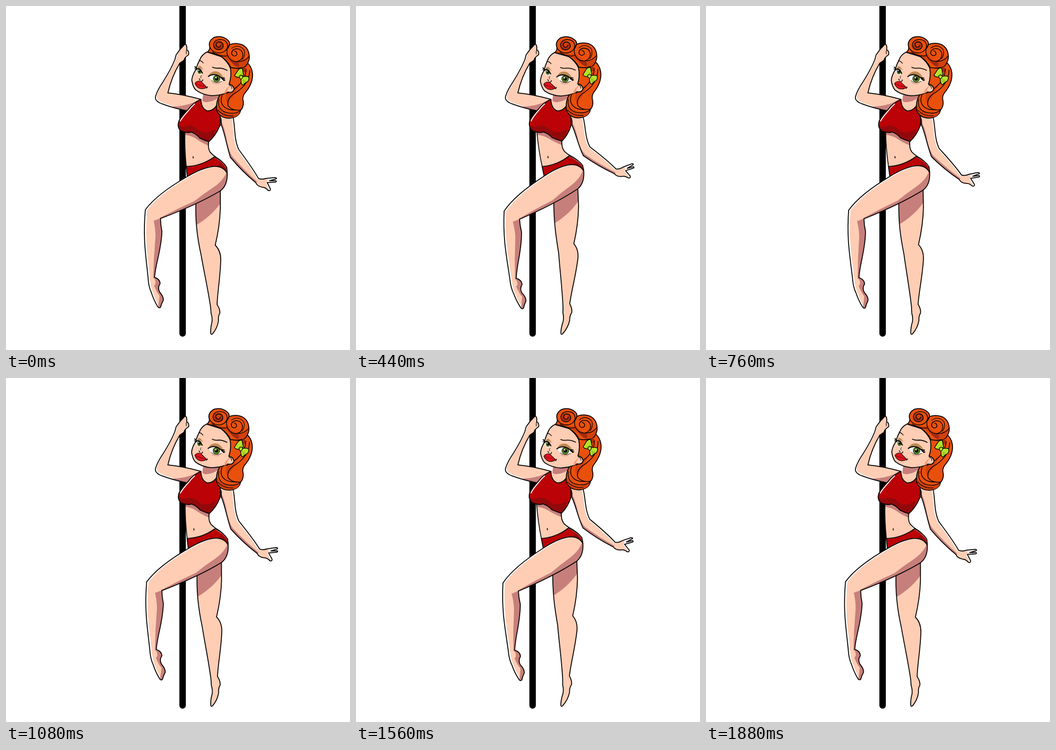
These frames come from a looping animation (748 px wide and 748 px high, 1.92 s). An HTML page with a canvas:

```html
<!DOCTYPE html>
<html lang="en">
<head>
<meta charset="utf-8">
<title>Pole dancer</title>
<style>
html, body { margin: 0; width: 100%; height: 100%; overflow: hidden; background: #fff; }
canvas { display: block; width: 748px; height: 748px; }
</style>
</head>
<body>
<canvas id="stage" width="748" height="748"></canvas>
<script>
const ctx = document.getElementById('stage').getContext('2d');
const SWAY = 960, STEP = 40;
const SKIN = '#ffcdb3', SHADE = '#c77f7b', RED = '#bb0307', DARK_RED = '#93090b';
const HAIR = '#e9500c', HAIR_MID = '#d3400b', HAIR_DARK = '#a52b10', LIME = '#b5e32c', INK = '#080505';

let k = 0;     // sway, 0 to 1
let warp;      // how the current part bends

const clamp = v => Math.max(0, Math.min(1, v));
const turn = (x, y, cx, cy, a) => {
  const c = Math.cos(a), s = Math.sin(a);
  return [cx + (x - cx) * c - (y - cy) * s, cy + (x - cx) * s + (y - cy) * c];
};

// Piecewise linear lookup over [position, value] stops
function ramp(v, stops) {
  for (let i = 1; i < stops.length; i++) {
    const [a, p] = stops[i - 1], [b, q] = stops[i];
    if (v <= b) return p + (q - p) * clamp((v - a) / (b - a));
  }
  return stops[stops.length - 1][1];
}

const still = (x, y) => [x, y];

const torso = (x, y) => {
  const u = Math.max(0, (y - 235) / 125) * k;
  return [x + 14 * u, y - 0.05 * (x - 390) * u];
};

const frontLeg = (x, y) => {
  const u = x - 481, v = y - 360;
  return [x + k * (14 - 0.008 * u + 0.0445 * v), y + k * (-5 - 0.0442 * u + 0.0015 * v)];
};

const backLeg = (x, y) => [
  x + k * ramp(y, [[400, 16], [440, 18], [517, 19], [655, 5.2], [714, 0]]),
  y + k * ramp(y, [[400, -6], [517, -3], [655, -1.5], [714, 0]])
];

const freeArm = (x, y) => {
  const bend = clamp((y - 295) / 40), lift = clamp((y - 245) / 75) * k;
  const [px, py] = turn(x, y, 495, 320, -0.26 * k * bend * bend * (3 - 2 * bend));
  return [px + 4 * lift, py - 5 * lift];
};

const head = (x, y) => turn(x, y, 465, 235, -0.043 * k);

const shape = d => new Path2D(d.replace(/([\d.]+),([\d.]+)/g,
  (m, x, y) => warp(+x, +y).map(v => v.toFixed(2)).join(',')));

function fill(d, color) {
  ctx.fillStyle = color;
  ctx.fill(shape(d));
}

function line(d, width = 2, color = INK) {
  ctx.strokeStyle = color;
  ctx.lineWidth = width;
  ctx.stroke(shape(d));
}

function inked(d, color, width = 2) {
  fill(d, color);
  line(d, width);
}

// Colour shifted inside its outline leaves a white rim of light
function lit(outline, color, dx, dy, shades, edge = outline) {
  const path = shape(outline);
  ctx.save();
  ctx.fillStyle = '#fff';
  ctx.fill(path);
  ctx.clip(path);
  ctx.translate(dx, dy);
  ctx.fillStyle = color;
  ctx.fill(path);
  ctx.translate(-dx, -dy);
  for (const [d, c] of shades) fill(d, c);
  ctx.restore();
  line(edge);
}

function drawPole() {
  warp = still;
  line('M384,0 L384,712', 14, '#000');
}

function drawBackLeg() {
  warp = backLeg;
  lit('M466,396 L466,440 Q465,478 455,520 Q467,532 467,552 C466,590 460,620 459,649 Q466,660 465,668 ' +
      'Q461,674 462,684 Q460,700 449,713 Q445,716 445,709 Q445,697 448,687 Q449,677 446,669 L445,656 ' +
      'C440,620 430,575 424,540 C416,505 411,470 413,424 Z', SKIN, 1, 0,
    [['M408,425 L470,392 L467,428 Q447,457 411,478 Z', SHADE]]);
}

function drawTorso() {
  warp = torso;
  const back = 'M441,292 Q438,309 444,318 Q449,324 457,329 Q476,340 481,360';
  const belly = 'M389,272 Q388,312 392,349 L395,373';
  lit('M389,268 Q388,312 392,349 L395,380 L470,380 L481,360 Q476,340 457,329 Q440,319 441,288 Z', SKIN, -3, 1,
    [['M385,270 L388,280 Q401,281 412,288 Q426,298 441,304 L446,285 Z', SHADE]], back);
  line(belly, 1.8);
  fill('M406.5,326 Q409,328 407.5,332 Q405,331 406.5,326 Z', INK);

  lit('M392,349 Q425,348 453,328 Q472,337 480,351 L481,364 Q470,348 450,349 Q426,352 394,371 Z', RED, -1, 1,
    [['M466,341 Q478,350 481,364 Q472,351 460,348 Z', DARK_RED]]);
}

function drawFreeArm() {
  warp = freeArm;
  const edge = 'M493,238 C499,262 495,288 506,312 C522,334 536,352 549,375 Q557,378 565,375 ' +
    'L585,373 Q590,374 587,376 L573,380 L587,380 Q589,382 586,383 L568,384 Q572,392 575,398 Q575,403 570,401 ' +
    'Q564,394 557,394 Q546,392 543,384 C526,370 507,352 488,329 C481,308 477,281 468,258 L467,244';
  lit(edge + ' L466,232 Z', SKIN, -3, 1, [
    ['M464,244 Q474,258 479,286 Q483,314 493,328 Q518,357 546,382 L541,389 L484,333 L466,268 Z', SHADE],
    ['M569,372 L592,370 L590,385 L568,383 Z', '#fff']
  ], edge);
}

function drawPoleArm() {
  warp = still;
  const edge = 'M394,228 Q364,222 340,213 Q323,207 325,197 Q329,183 342,164 Q359,137 367,117 L370,106 ' +
    'Q378,94 389,83 Q394,83 393,95 Q399,99 397,106 Q388,112 387,118 L378,124 Q360,154 352,189 ' +
    'Q384,192 424,203';
  lit(edge + ' L424,228 Z', SKIN, 3, -2, [
    ['M358,219 Q388,219 412,208 L424,230 L390,232 Z', SHADE]
  ], edge);
  line('M393,95 Q391,99 392,104', 1.3);
}

function drawNeck() {
  warp = still;
  fill('M430,186 L426,205 Q423,230 443,231 Q462,230 466,212 L466,186 Z', SKIN);
  fill('M429,190 L427,206 Q432,211 443,208 Q455,206 465,196 L466,186 Z', SHADE);
}

function drawTop() {
  warp = torso;
  lit('M424,203 Q407,210 396,225 Q381,240 376,250 Q371,264 381,272 Q393,277 403,274 Q414,278 421,287 ' +
      'Q431,292 441,295 Q456,282 465,260 Q468,244 463,226 L461,211 Q452,229 437,228 Q424,222 424,203 Z',
    RED, 0, 0,
    [['M370,256 Q384,267 396,260 Q410,259 420,271 Q434,280 455,268 L448,300 L420,298 L372,280 Z', DARK_RED]]);
  line('M410,213 Q403,219 398,226 Q384,241 379,250', 2, '#fff');
  line('M466,242 Q470,246 467,260', 1.4);
}

function drawFrontLeg() {
  warp = frontLeg;
  lit('M394,371 Q426,352 450,349 Q472,347 481,364 Q482,390 466,402 C434,421 384,444 336,462 ' +
      'Q336,476 339,490 C338,530 325,560 323,590 Q335,594 335,604 Q329,612 334,622 Q343,632 342,640 ' +
      'Q338,647 336,655 Q333,658 330,654 Q321,639 316,623 Q310,610 309,592 C305,548 297,508 303,443 ' +
      'Q328,409 394,371 Z', SKIN, 4, 1, [
    ['M482,354 Q476,378 450,395 Q430,408 410,424 Q372,441 334,461 L345,470 L475,410 L488,380 Z', SHADE],
    ['M340,460 L321,467 Q325,484 325,501 Q321,547 320,592 L330,592 L345,490 Z', SHADE],
    ['M321,590 Q329,602 322,608 Q329,625 334,630 Q333,643 330,657 L346,650 L340,595 Z', SHADE]
  ]);
}

function drawBackHair() {
  inked('M468,190 Q456,204 458,226 Q464,244 486,244 Q507,242 510,227 Q517,220 516,208 Q513,198 519,190 ' +
    'Q538,168 536,146 Q534,130 522,121 L484,112 L482,184 Z', HAIR);
  fill('M459,214 Q466,231 487,235 Q504,233 509,227 Q507,243 486,243 Q463,242 459,223 Z', HAIR_MID);
  fill('M484,180 Q497,179 509,168 Q498,187 493,198 Q483,207 484,216 Q476,207 479,194 Z', HAIR_MID);
  fill('M486,118 Q511,125 524,138 L519,145 Q501,133 488,135 Z', HAIR_DARK);
  line('M463,203 Q459,224 477,231 Q498,237 510,227', 1.6);
  line('M470,194 Q463,212 478,222 Q487,227 500,226', 1.6);
  line('M530,140 Q529,170 499,189 Q479,200 483,217 Q493,229 510,226', 1.6);
  line('M522,139 Q521,160 501,177 Q489,186 480,190', 1.6);
  line('M460,226 Q474,241 494,239', 1.3);
}

function drawFace() {
  inked('M437,100 Q425,106 421,118 Q415,129 413,138 Q405,150 404,161 Q406,175 412,182 Q426,193 447,195 ' +
    'Q472,194 482,187 Q493,190 496,181 Q495,172 485,170 Q491,153 488,135 Q482,121 468,110 Z', SKIN);
  fill('M489,173 Q477,178 474,191 L482,187 Q478,184 489,173 Z', '#ef9b77');
  line('M485,172 Q492,174 491,180', 1.2);

  fill('M416,137 Q420,122 430,140 Q423,133 416,137 Z', '#bd8952');
  fill('M440,152 Q447,139 461,143 Q471,148 474,160 Q458,144 440,152 Z', '#bd8952');

  fill('M414,137 Q422,131 427,146 Q421,153 415,145 Z', '#fff');
  fill('M441,153 Q457,143 472,162 Q456,172 446,161 Z', '#fff');
  const eyes = [[421, 142, 4.6, 5.8], [458, 158, 8, 7.6]];
  for (const [x, y, rx, ry] of eyes) {
    const [ex, ey] = warp(x, y);
    const disc = (sx, sy, s, color) => {
      ctx.beginPath();
      ctx.ellipse(ex + sx, ey + sy, rx * s, ry * s, 0, 0, 7);
      ctx.fillStyle = color;
      ctx.fill();
    };
    disc(0, 0, 1, '#24330c');
    disc(0, 0.4, 0.83, '#5f8420');
    disc(0, 0, 0.5, '#090b04');
    disc(-1.4, -2.2, 0.2, '#fff');
  }
  line('M411,132 L415,137 Q421,133 427,146', 2.3);
  line('M410,136 L415,139', 1.4);
  line('M440,153 Q457,142 474,162 M468,156 L475,157 M470,159 L476,161', 2.3);
  line('M447,162 Q456,170 469,164', 1);
  line('M449,167 Q457,171 464,168', 0.8, '#a86b51');
  line('M420,118 Q425,119 429,124', 1.4);
  line('M449,133 Q454,136 463,135 Q472,135 481,140', 1.8);

  line('M425,151 Q422,154 424,157', 1);
  line('M420,158 L422,161 M425,163 Q428,164 428,160', 1.5);
  inked('M411,168 Q414,163 421,163 Q424,163 427,167 L437,177 Q428,182 420,179 Q413,175 411,168 Z', '#e0131c', 1.1);
  line('M411,168 Q422,173 437,177', 1.2, '#720b13');
  line('M436,179 Q439,177 438,175', 1.2);
}

function drawTopHair() {
  inked('M438,100 Q444,95 443,89 Q439,76 453,68 Q470,63 482,74 Q487,78 486,84 Q499,79 513,84 ' +
    'Q528,91 529,109 Q530,120 521,131 Q507,138 489,134 Q482,119 468,110 Q451,103 438,100 Z', HAIR);
  fill('M446,98 Q465,108 484,104 Q489,116 503,121 Q519,121 528,109 Q527,126 517,133 ' +
    'Q500,136 488,121 Q468,106 446,101 Z', HAIR_MID);
  fill('M484,113 Q491,121 505,122 Q509,129 505,133 Q495,131 484,113 Z', HAIR_DARK);
  fill('M455,78 Q466,73 472,82 Q473,93 463,95 Q452,94 453,84 Z', HAIR_DARK);
  fill('M458,80 Q465,78 468,84 Q465,91 459,88 Z', HAIR_MID);

  line('M443,89 Q449,102 465,102 Q480,100 482,87 Q481,73 465,73 Q452,74 451,85 Q453,96 464,95 ' +
    'Q474,93 472,83 Q468,76 460,79 Q454,84 460,89 Q465,91 467,85', 1.6);
  line('M486,84 Q477,95 482,108 Q488,121 502,121 Q515,118 515,105 Q513,93 500,93 ' +
    'Q489,96 491,105 Q496,112 502,106 Q503,99 497,98', 1.6);
  line('M482,108 Q468,112 449,100', 1.5);
  line('M502,121 Q519,122 529,109', 1.5);
  line('M486,84 Q484,92 478,96', 1.5);
  line('M491,92 Q506,81 518,96 Q521,107 514,116', 1.3);
}

function drawBow() {
  inked('M509,155 Q500,156 497,151 Q501,145 505,139 Q510,134 514,136 Q515,144 517,150 Z', LIME, 1.5);
  inked('M511,156 Q518,151 527,154 Q530,157 526,164 Q520,167 515,172 Q510,170 511,156 Z', LIME, 1.5);
  fill('M502,153 Q509,150 514,144 L515,150 L508,154 Z', '#9dcb24');
  fill('M513,159 Q519,160 523,164 L516,169 Z', '#9dcb24');
  inked('M508,152 Q512,149 515,153 Q515,157 511,159 Q506,157 508,152 Z', LIME, 1.3);
}

function draw(ms) {
  k = 0.508 * (1 - Math.cos(2 * Math.PI * ms / SWAY));
  ctx.fillStyle = '#fff';
  ctx.fillRect(0, 0, 748, 748);
  ctx.lineCap = ctx.lineJoin = 'round';
  drawPole();
  drawBackLeg();
  drawTorso();
  drawFreeArm();
  drawPoleArm();
  drawNeck();
  drawTop();
  drawFrontLeg();
  warp = head;
  drawBackHair();
  drawFace();
  drawTopHair();
  drawBow();
}

const start = performance.now();
function tick() {
  const ms = performance.now() - start;
  draw(Math.floor(ms / STEP) * STEP % (SWAY * 2));
  requestAnimationFrame(tick);
}
tick();
</script>
</body>
</html>
```
